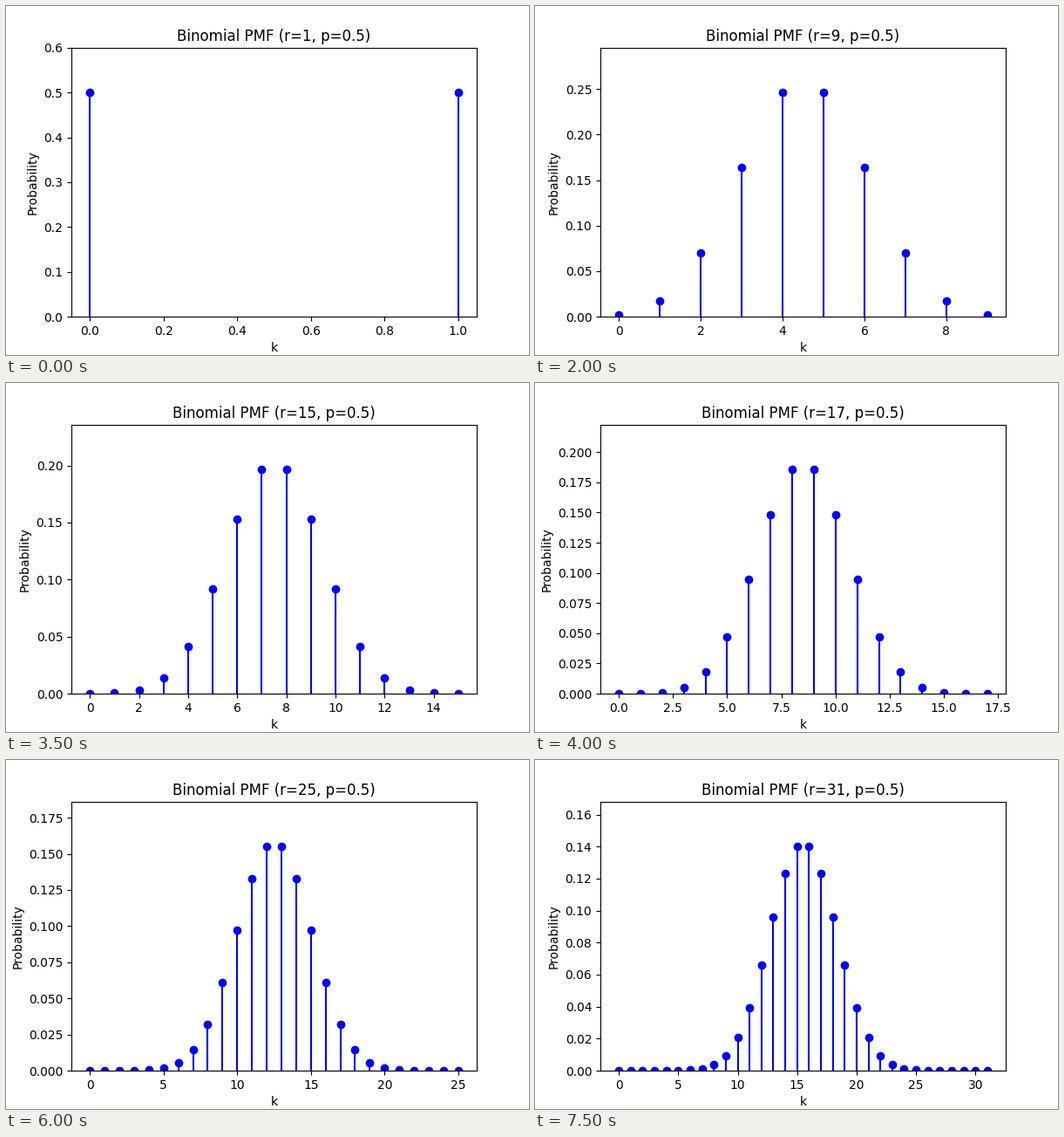
Write a matplotlib script that moves like this. It is 600 px wide and 400 px high and loops after 8000 ms.

```python
from math import comb

import matplotlib.pyplot as plt
import numpy as np
from matplotlib.animation import FuncAnimation

P = 0.5
FRAMES = 16
INTERVAL = 500

fig, ax = plt.subplots(figsize=(6, 4), dpi=100)


def binomial_pmf(r, p):
    return np.array([comb(r, k) * p**k * (1 - p) ** (r - k) for k in range(r + 1)])


def update(i):
    r = 2 * i + 1
    k = np.arange(r + 1)
    pmf = binomial_pmf(r, P)

    ax.clear()
    ax.vlines(k, 0, pmf, colors="b", lw=1.5)
    ax.plot(k, pmf, "bo")
    ax.set_ylim(0, pmf.max() * 1.2)
    ax.set_title(f"Binomial PMF (r={r}, p={P})")
    ax.set_xlabel("k")
    ax.set_ylabel("Probability")


anim = FuncAnimation(fig, update, frames=FRAMES, interval=INTERVAL,
                     init_func=lambda: update(0), repeat=True, repeat_delay=0)
plt.show()
```
